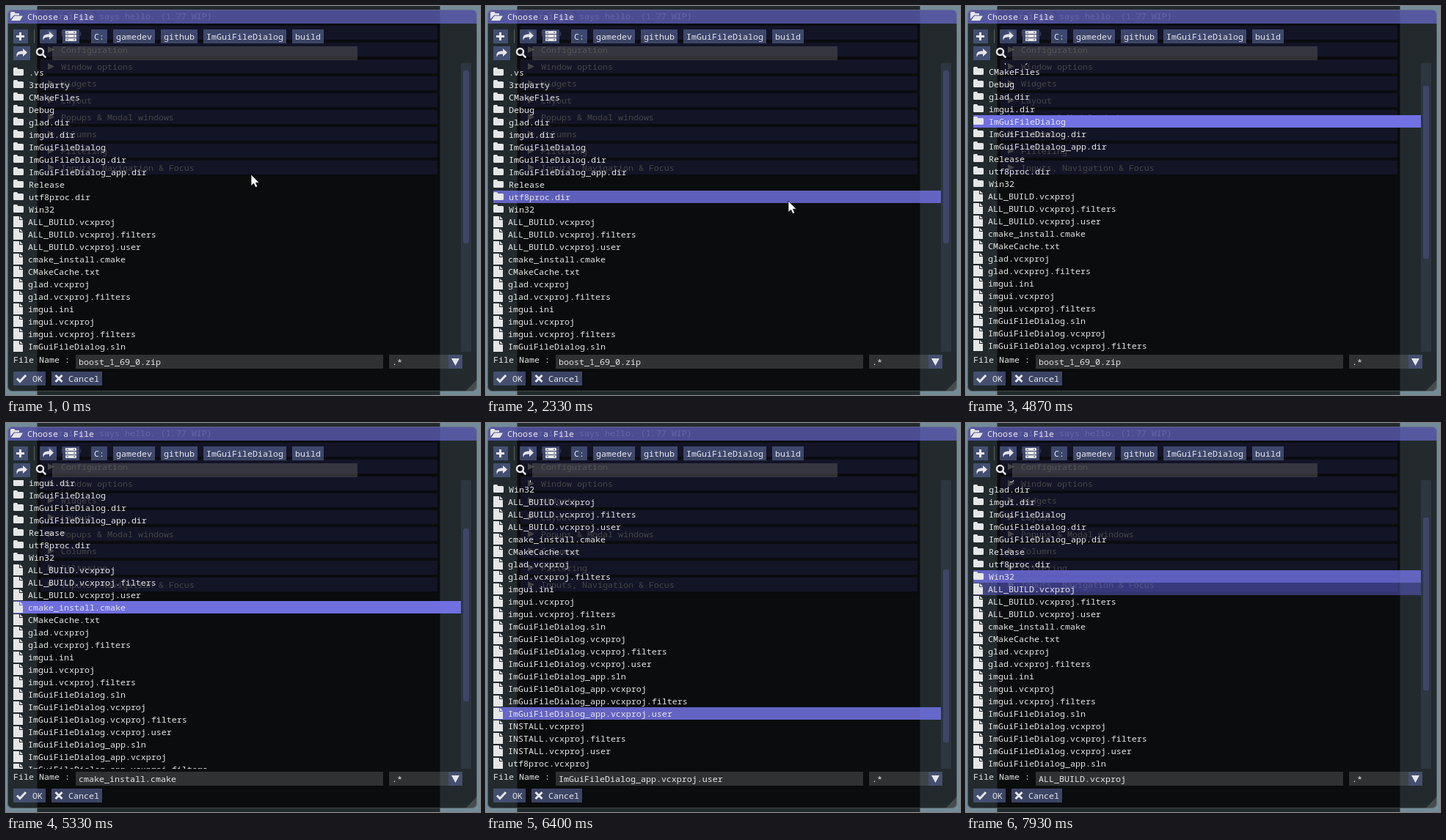
An HTML page with a canvas for the animation above (8000 ms loop, 646 by 531 pixels).

```html
<!DOCTYPE html>
<html lang="en">
<head>
<meta charset="utf-8">
<title>Choose a File</title>
<style>
html, body { margin: 0; width: 100%; height: 100%; overflow: hidden; background: #738c99; }
canvas { display: block; }
</style>
</head>
<body>
<canvas id="stage" width="646" height="531"></canvas>
<script>
const ctx = document.getElementById('stage').getContext('2d');
const LOOP = 8000, STEP = 1000 / 15, ROW = 17, TOP = 82, FIRST_FILE = 12;
const WHITE = '#e6e6e6', BUTTON = 'rgba(89,102,156,.62)', FRAME = 'rgba(110,110,110,.39)';

const proj = (name, user) =>
  ['', '.filters', ...(user ? ['.user'] : [])].map(s => name + '.vcxproj' + s);
const items = [
  '.vs', '3rdparty', 'CMakeFiles', 'Debug', 'glad.dir', 'imgui.dir', 'ImGuiFileDialog',
  'ImGuiFileDialog.dir', 'ImGuiFileDialog_app.dir', 'Release', 'utf8proc.dir', 'Win32',
  ...proj('ALL_BUILD', true), 'cmake_install.cmake', 'CMakeCache.txt',
  ...proj('glad'), 'imgui.ini', ...proj('imgui'),
  'ImGuiFileDialog.sln', ...proj('ImGuiFileDialog', true),
  'ImGuiFileDialog_app.sln', ...proj('ImGuiFileDialog_app', true),
  ...proj('INSTALL', true), ...proj('utf8proc'), ...proj('ZERO_CHECK', true)
];
const sections = ['Help', 'Configuration', 'Window options', 'Widgets', 'Layout',
  'Popups & Modal windows', 'Columns', 'Filtering', 'Inputs, Navigation & Focus'];

// Arrow key presses as [time, row]: taps, a held Down, a held Up, taps
const presses = [[3795, 1], [4005, 2], [4205, 3], [4405, 4], [4605, 5]];
for (let i = 6; i <= 30; i++) presses.push([4855 + 50 * (i - 6), i]);
presses.push([6245, 29]);
for (let i = 28; i >= 13; i--) presses.push([6495 + 50 * (28 - i), i]);
presses.push([7490, 12], [7730, 11]);

const mousePath = [
  [60, 334, 230], [200, 313, 173], [333, 318, 190], [430, 318, 190], [900, 372, 335],
  [1267, 422, 503], [1333, 420, 510], [1500, 418, 470], [2133, 411, 257],
  [2270, 411, 257], [2333, 412, 266], [2600, 410, 359]
];
const FOCUS = 1300, LEAVE = 2640;

function mouseAt(t) {
  if (t > LEAVE) return null;
  const n = mousePath.findIndex(p => p[0] > t);
  if (n === 0) return mousePath[0].slice(1);
  if (n < 0) return mousePath[mousePath.length - 1].slice(1);
  const [t0, x0, y0] = mousePath[n - 1], [t1, x1, y1] = mousePath[n];
  const k = (t - t0) / (t1 - t0);
  return [Math.round(x0 + (x1 - x0) * k), Math.round(y0 + (y1 - y0) * k)];
}
const lastPress = (t, ok = () => true) =>
  presses.filter(([time, row]) => time <= t && ok(row)).pop();
const selectedAt = t => (lastPress(t, row => row >= FIRST_FILE) || [0, -1])[1];

function box(x0, y0, x1, y1, color, r = 0) {
  ctx.fillStyle = color;
  ctx.beginPath();
  ctx.roundRect(x0, y0, x1 - x0, y1 - y0, r);
  ctx.fill();
}
function border(x0, y0, x1, y1, r) {
  ctx.strokeStyle = 'rgba(128,128,128,.5)';
  ctx.lineWidth = 1;
  ctx.beginPath();
  ctx.roundRect(x0 + .5, y0 + .5, x1 - x0 - 1, y1 - y0 - 1, r);
  ctx.stroke();
}
function text(s, x, mid, color = WHITE) {
  ctx.fillStyle = color;
  ctx.fillText(s, x, mid + 4);
}
function shape(d, x, y, color = WHITE) {
  ctx.save();
  ctx.translate(x, y);
  ctx.fillStyle = color;
  ctx.fill(new Path2D(d));
  ctx.restore();
}
function line(d, width, color = WHITE) {
  ctx.strokeStyle = color;
  ctx.lineWidth = width;
  ctx.stroke(new Path2D(d));
}
function button(x0, y, x1, label, textX = x0 + 4) {
  box(x0, y, x1, y + 19, BUTTON);
  if (label) text(label, textX, y + 10);
}

const FOLDER = 'M0 1.5Q0 0 1.5 0H4.5Q6 0 6 2H12.5Q14 2 14 3.5V9.5Q14 11 12.5 11H1.5Q0 11 0 9.5Z';
const FILE = 'M0 0H8V5H13V15H0ZM9 0L13 4H9Z';
const OPEN = 'M0 1.5Q0 0 1.5 0H5L7 2H12V4.5H5L0 10ZM5.5 5.5H17L13 12H1Z';
const SHARE = 'M1 12C-1 6 2 3.5 9 3.5V0L15 5.5L9 11V7.5C4 7.5 1.5 8 1 12Z';
const POINTER = 'M0 0V15.5L3.6 12.2L6 17.6L8.8 16.4L6.4 11.2H11Z';

function backdrop() {
  box(0, 0, 646, 531, '#738c99');
  box(42, 0, 592, 531, 'rgba(0,0,0,.7)');
  border(42, -9, 592, 540, 0);
  text('dear imgui says hello. (1.77 WIP)', 50, 14);
  sections.forEach((name, i) => {
    const mid = 37 + 23 * i;
    box(47, mid - 10, 588, mid + 9, 'rgba(102,102,230,.45)');
    shape('M0 0L9 4.5L0 9Z', 57, mid - 5);
    text(name, 75, mid);
  });
}

function dialogFrame() {
  box(2, 24, 642, 526, 'rgba(0,0,0,.7)', [0, 0, 7, 7]);
  box(2, 5, 642, 24, 'rgba(82,82,161,.87)', [7, 7, 0, 0]);
  shape('M16 0V9Q16 16 9 16H0Z', 626, 510, 'rgba(255,255,255,.16)');
  border(2, 5, 642, 526, 7);
  shape(OPEN, 6, 8);
  text('Choose a File', 29, 15);

  button(10, 32, 30);
  line('M14 41.5H25M19.5 36V47', 3);
  box(38, 32, 39, 51, 'rgba(128,128,128,.6)');
  button(46, 32, 69);
  shape(SHARE, 50, 35);
  button(77, 32, 100);
  for (let i = 0; i < 3; i++) {
    const y = 34 + 5 * i;
    box(81, y, 96, y + 4, WHITE, 1);
    box(82.5, y + 1.5, 85, y + 2.5, '#3b4466');
    box(92, y + 1.5, 94, y + 2.5, '#3b4466');
  }
  let x = 116;
  for (const dir of ['C:', 'gamedev', 'github', 'ImGuiFileDialog', 'build']) {
    const end = x + dir.length * 7 + 8;
    button(x, 32, end, dir);
    x = end + 8;
  }

  button(10, 55, 33);
  shape(SHARE, 14, 58);
  line('M51 62.5A4.5 4.5 0 1 1 42 62.5A4.5 4.5 0 1 1 51 62.5M49.8 65.8L54.3 70.3', 2.5);
  box(63, 55, 479, 74, FRAME);
}

function fileList(t, mouse) {
  const press = lastPress(t);
  const scroll = press ? Math.round(6.6 * press[1] - 4.6) : 0;
  const flash = press ? Math.max(0, 1 - (t - press[0]) / 1000) : 0;
  const chosen = selectedAt(t);
  const hover = mouse && t > FOCUS && mouse[1] < 472 ? Math.floor((mouse[1] - TOP) / ROW) : -1;

  ctx.save();
  ctx.beginPath();
  ctx.rect(10, 78, 624, 394);
  ctx.clip();
  items.forEach((name, i) => {
    const y = TOP + ROW * i - scroll;
    if (y < 60 || y > 472) return;
    let color;
    if (press && press[1] === i && flash > 0) color = `rgba(115,115,230,${flash})`;
    else if (i === hover) color = 'rgba(115,115,230,.8)';
    else if (i === chosen) color = 'rgba(102,102,230,.45)';
    if (color) box(10, y, 620, y + ROW, color);
    const folder = i < FIRST_FILE;
    if (folder) shape(FOLDER, 10, y + 2);
    else shape(FILE, 10, y + 1);
    text(name, folder ? 31 : 30, y + 9);
  });
  box(620, 78, 634, 472, 'rgba(51,64,77,.6)');
  const thumb = Math.round(88 + scroll * .6);
  box(623, thumb, 631, thumb + 236, 'rgba(102,102,204,.3)', 3);
  ctx.restore();
}

function footer(t) {
  text('File Name :', 10, 483);
  box(95, 476, 514, 495, FRAME);
  // The field is refreshed just after the list
  text(items[selectedAt(t + 15)] || 'boost_1_69_0.zip', 99, 486);
  box(522, 476, 603, 495, FRAME);
  text('.*', 526, 486);
  button(603, 476, 622);
  shape('M0 0H11L5.5 10Z', 607, 481);
  button(10, 499, 54, 'OK', 36);
  line('M15 508.5L19 512.5L27 504', 3);
  button(62, 499, 131, 'Cancel', 85);
  line('M67.5 504L76.5 513M76.5 504L67.5 513', 3);
}

function draw(now) {
  const t = Math.floor((now % LOOP + 5) / STEP) * STEP;
  const mouse = mouseAt(t);
  ctx.font = '11.667px "Noto Sans Mono", "DejaVu Sans Mono", monospace';
  backdrop();
  dialogFrame();
  fileList(t, mouse);
  footer(t);
  if (mouse) {
    shape(POINTER, mouse[0], mouse[1], '#fff');
    ctx.save();
    ctx.translate(...mouse);
    line(POINTER, .8, '#111');
    ctx.restore();
  }
}

let start;
function tick(now) {
  start ??= now;
  draw(now - start);
  requestAnimationFrame(tick);
}
draw(0);
requestAnimationFrame(tick);
</script>
</body>
</html>
```
